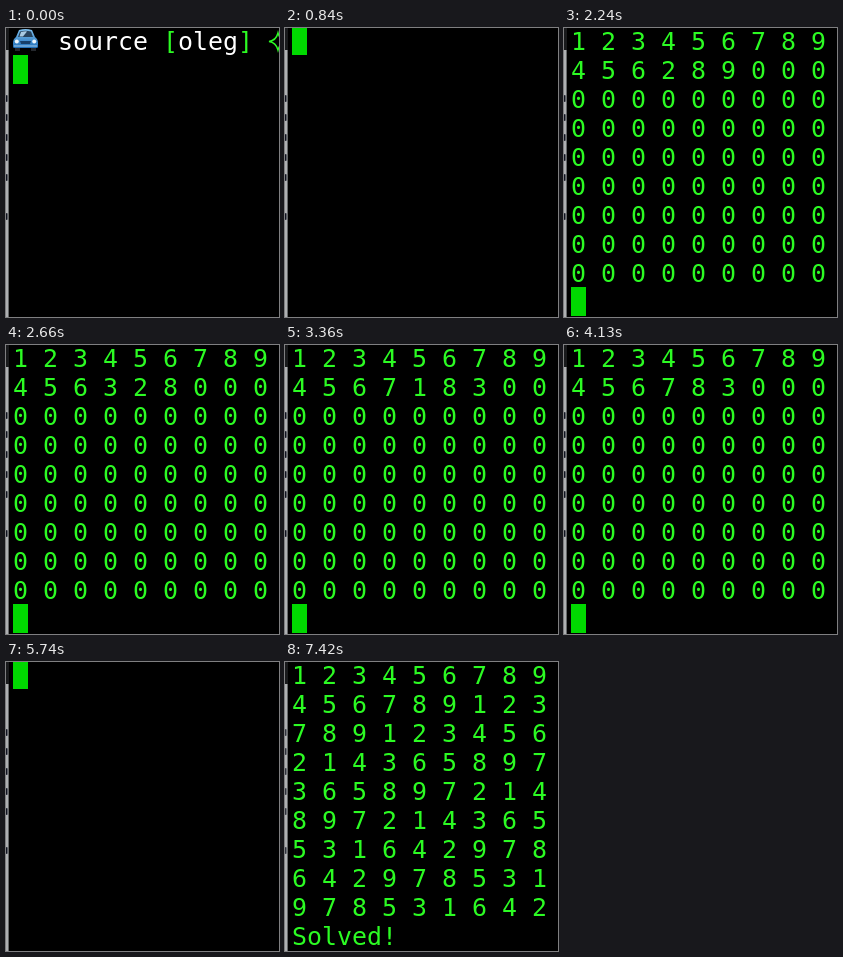
An HTML page that plays this animation: 273 by 289 pixels, repeating every 7490 ms.

```html
<!DOCTYPE html>
<html lang="en">
<head>
<meta charset="utf-8">
<title>Sudoku solver in a terminal</title>
<style>
  html, body { margin: 0; width: 100%; height: 100%; overflow: hidden; background: #000; }
  #stage { position: relative; width: 273px; height: 289px; overflow: hidden; background: #000; }
  #stage > * { position: absolute; }
  .term {
    margin: 0; top: -1px; white-space: pre; color: #2cfb23;
    font: 24.92px/29px "DejaVu Sans Mono", "Liberation Mono", monospace;
  }
  #grid { left: 7px; }
  #prompt { left: 52px; }
  #prompt b { font-weight: normal; color: #fff; }
  #cursor { left: 7px; width: 15px; height: 29px; background: #00d900; }
  svg { left: 0; top: 0; }
</style>
</head>
<body>
<div id="stage">
  <svg id="edge" width="4" height="289">
    <rect width="2" height="289" fill="#aeb0b2"/>
    <rect x="2" width="1" height="289" fill="#66686a"/>
    <rect width="3" height="22" fill="#191a1c"/>
    <g id="marks" fill="#10131f"></g>
  </svg>
  <svg id="art" width="273" height="28">
    <defs>
      <linearGradient id="paint" x2="0" y2="1">
        <stop offset="0" stop-color="#7fc0ee"/>
        <stop offset="1" stop-color="#1f6fb8"/>
      </linearGradient>
    </defs>
    <g>
      <path d="M9 17h5v6h-5zM25 17h5v6h-5z" fill="#25282d"/>
      <path d="M13 2Q19.500 0 26 2L29 9Q32 11 32 15V19Q32 20 30 20H9Q7 20 7 19V15Q7 11 10 9Z" fill="url(#paint)"/>
      <path d="M14 3.500Q19.500 2 25 3.500L27 9H12Z" fill="#27435c"/>
      <path d="M15 4Q19.500 3 21 3.500L17 8.500H13.500Z" fill="#a9cbe2"/>
      <path d="M14 13H25L24 16H15Z" fill="#173f68"/>
      <circle cx="10.800" cy="13.500" r="2" fill="#eef6fb"/>
      <circle cx="28.200" cy="13.500" r="2" fill="#eef6fb"/>
      <path d="M8 18H31" stroke="#a8cce8"/>
    </g>
    <path d="M263 13.500Q270 12.500 272 5Q274 12.500 281 13.500Q274 14.500 272 22Q270 14.500 263 13.500Z"
      fill="none" stroke="#2cfb23" stroke-width="1.500"/>
  </svg>
  <div id="prompt" class="term"><b>source</b> [<b>oleg</b>]</div>
  <pre id="grid" class="term"></pre>
  <div id="cursor"></div>
</div>
<script>
const TICK = 70, LOOP = 7490, ROW = 29;
const SOLVED = 91, EDGE_CHANGE = 106;
const $ = id => document.getElementById(id);

// Depth-first search from an empty board; keeps the board after each placement.
function solve() {
  const cells = Array(81).fill(0), log = [cells.slice()];
  const fits = (pos, n) => {
    const r = Math.floor(pos / 9), c = pos % 9;
    const br = r - r % 3, bc = c - c % 3;
    for (let i = 0; i < 9; i++) {
      const box = (br + Math.floor(i / 3)) * 9 + bc + i % 3;
      if (cells[r * 9 + i] === n || cells[i * 9 + c] === n || cells[box] === n) return false;
    }
    return true;
  };
  const fill = pos => {
    if (pos === 81) return true;
    for (let n = 1; n <= 9; n++) {
      if (!fits(pos, n)) continue;
      cells[pos] = n;
      log.push(cells.slice());
      if (fill(pos + 1)) return true;
      cells[pos] = 0;
    }
    return false;
  };
  fill(0);
  return log;
}

const log = solve(), last = log.length - 1;

// Search progress: [tick, placements made]
const pace = [
  [1, 1], [32, 117], [41, 166], [42, 166], [43, 176], [44, 176],
  [48, 208], [59, 256], [88, last - 8], [90, last], [107, last]
];

function placed(tick) {
  const i = Math.max(1, pace.findIndex(p => p[0] >= tick));
  const [t0, s0] = pace[i - 1], [t1, s1] = pace[i];
  return Math.round(s0 + (s1 - s0) * (tick - t0) / (t1 - t0));
}

function boardText(cells) {
  let text = "";
  for (let r = 0; r < 9; r++) text += cells.slice(r * 9, r * 9 + 9).join(" ") + "\n";
  return text;
}

// Slivers of the window behind the terminal
$("marks").innerHTML = [70, 89, 109, 129, 149, 188]
  .map(y => `<rect y="${y - 3}" width="1.500" height="7" rx=".7"/>`).join("");

function draw(tick) {
  const start = tick === 0, done = tick >= SOLVED;
  const blank = tick < 88 && tick % 7 === 5;   // caught just after a screen clear
  $("prompt").hidden = !start;
  $("art").style.display = start ? "" : "none";
  $("grid").textContent = start || blank ? "" : boardText(log[placed(tick)]) + (done ? "Solved!" : "");
  $("cursor").hidden = done;
  $("cursor").style.top = (start ? 1 : blank ? 0 : 9) * ROW - 2 + "px";
  $("marks").style.opacity = tick >= EDGE_CHANGE ? 0.8 : 1;
}

let shown = -1;
const origin = performance.now();
function loop() {
  const tick = Math.floor(((performance.now() - origin) % LOOP) / TICK);
  if (tick !== shown) draw(shown = tick);
  requestAnimationFrame(loop);
}
loop();
</script>
</body>
</html>
```
